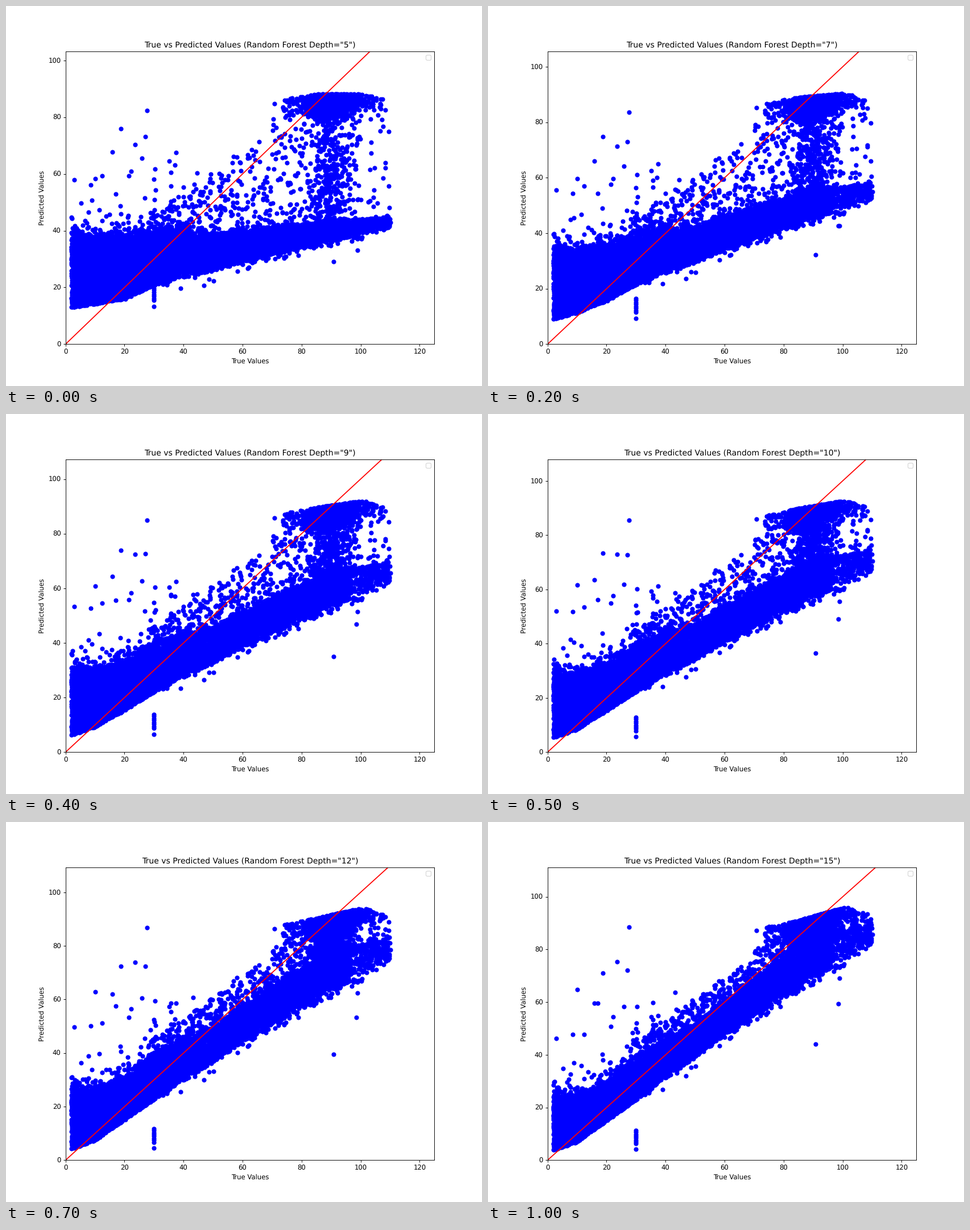
A matplotlib script that plays this animation: 837x669 px, repeating every 2 s.

```python
import numpy as np
import matplotlib.pyplot as plt
from matplotlib.animation import FuncAnimation

DPI = 83.7
FIRST, LAST = 5, 15
plt.rcParams["text.hinting"] = "none"

rng = np.random.default_rng(4)


def mix(a, b, s):
    return a + (b - a) * s


def ease(t, power):
    return 1 - (1 - t) ** power


def low(x, t):
    """Lower edge of the band; the left end settles sooner than the right."""
    start = np.interp(x, [2, 20, 30, 110], [12.8, 15.8, 20.8, 41])
    end = np.interp(x, [2, 10, 60, 110], [3.7, 6.9, 47, 82])
    return mix(start, end, ease(t, 2.6 - 1.2 * np.clip(x / 40, 0, 1)))


def high(x, t):
    """Upper edge of the band."""
    start = 35.9 + 0.09 * (x - 2)
    end = np.interp(x, [2, 15, 90, 110], [21.5, 25, 86, 91])
    return mix(start, end, ease(t, 1.6))


def top(x, t):
    """Ceiling of the predictions: flat at first, tilted later."""
    xs = [72, 85, 101, 110]
    start = np.interp(x, xs, [86, 88.1, 88.1, 86])
    end = np.interp(x, xs, [88, 91, 96.1, 93])
    return mix(start, end, t ** 0.75)


# Main band: dense on the left, thinner and softer on the right.
bx = np.concatenate([rng.uniform(2, 36, 6500),
                     30 + 66 * rng.random(4600) ** 1.15,
                     rng.uniform(94, 110.2, 260)])
bu = np.where(bx < 30, rng.random(bx.size), rng.beta(1.6, 1.6, bx.size))

# Fringe above and below the band.
fx = 2 + 40 * rng.random(330) ** 1.3
fy = np.minimum(rng.exponential(np.where(np.arange(330) < 200, 1.2, 4.2)), 12)
ux = rng.uniform(32, 108, 50)
uy = rng.exponential(1.0, 50)

# Loose points around the diagonal.
mx = rng.uniform(28, 86, 360)
mw = rng.random(360) ** 1.5

# Column between the band and the upper cluster.
cx = np.concatenate([rng.normal(90, 3.9, 470), rng.uniform(97, 110, 28)])
cw = rng.random(cx.size)

# Upper cluster.
tx = np.concatenate([rng.normal(90, 4.4, 1000), rng.uniform(73.5, 107.5, 150)])
tx = np.clip(tx, 73.5, 108)
ty = np.abs(rng.normal(0, 3.3, tx.size))

# Far points: a few landmarks as x, first y, last y, and random ones.
marks = np.array([[3, 58, 46.2], [18.8, 75.9, 71], [23.5, 70.4, 75.4],
                  [27, 73.2, 72.1], [27.6, 82.4, 88.6], [70.7, 84.8, 87.2],
                  [90.8, 29.2, 44], [98.5, 38.5, 59.5]])
strays = np.column_stack([rng.uniform(8, 45, 20), rng.uniform(50, 69, 20),
                          rng.uniform(46, 66, 20)])
ox, oa, ob = np.vstack([marks, strays]).T

stem = np.concatenate([[0], 2.2 + 0.72 * np.arange(8)])

X = np.concatenate([bx, fx, ux, mx, cx, tx, ox, np.full(stem.size, 30)])


def predict(d):
    """Predicted values of all points at tree depth d."""
    t = (d - FIRST) / (LAST - FIRST)
    wob = np.random.default_rng(d)

    def jitter(x, sd):
        return wob.normal(0, sd, x.size)

    band = mix(low(bx, t), high(bx, t), bu)
    fringe = high(fx, t) + fy * (1 + jitter(fx, 0.15))
    under = low(ux, t) - uy

    ridge = np.interp(mx, [28, 65, 75, 86], [45, 73, 85, 87])
    hm = high(mx, t)
    loose = mix(hm, np.maximum(ridge, hm + 2), mw) + jitter(mx, 0.6)
    column = mix(high(cx, t) - 2, top(cx, t), cw) + jitter(cx, 0.5)
    upper = top(tx, t) - np.abs(ty + jitter(tx, 0.3))

    far = mix(oa, ob, t)
    drop = low(30 * 0 + 2, t) + 0.4 + stem
    return np.concatenate([band, fringe, under,
                           np.minimum(loose, top(mx, t)),
                           np.minimum(column, top(cx, t)),
                           upper, far, drop])


fig, ax = plt.subplots(figsize=(837.01 / DPI, 669.01 / DPI), dpi=DPI)
dots = ax.scatter(X, np.zeros_like(X), color="blue")
ax.plot([0, 125], [0, 125], color="red")
ax.set_xlim(0, 125)
ax.set_xlabel("True Values")
ax.set_ylabel("Predicted Values")
title = ax.set_title("")
ax.legend([], [], loc="upper right")


def draw(i):
    d = min(FIRST + i, LAST)
    t = (d - FIRST) / (LAST - FIRST)
    dots.set_offsets(np.column_stack([X, predict(d)]))
    ax.set_ylim(0, 103.1 + 8 * t ** 0.75)
    title.set_text(f'True vs Predicted Values (Random Forest Depth="{d}")')
    return dots, title


anim = FuncAnimation(fig, draw, frames=20, interval=100, repeat=True, repeat_delay=0)
plt.show()
```
